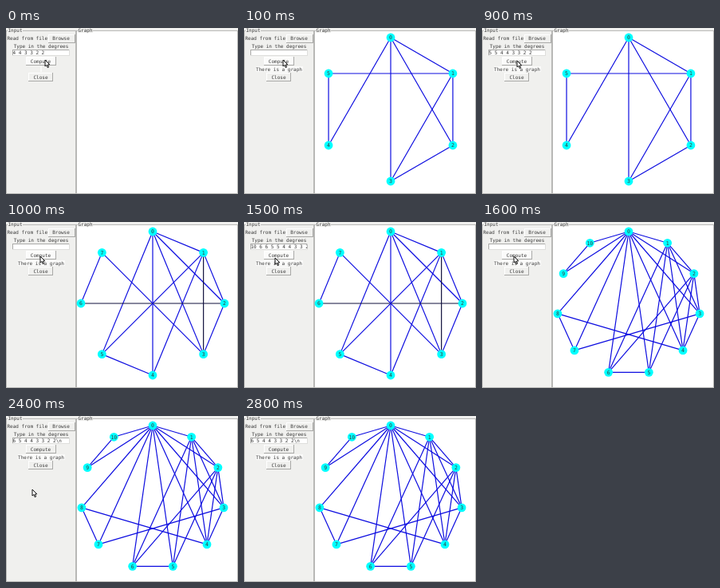
An HTML page with a canvas that plays this animation: 291 px wide and 208 px high, repeating every 3100 ms.

```html
<!DOCTYPE html>
<html lang="en">
<head>
<meta charset="utf-8">
<title>Degree sequence graph</title>
<style>
html, body { margin: 0; width: 100%; height: 100%; overflow: hidden; background: #f0f0ee; }
canvas { display: block; }
</style>
</head>
<body>
<canvas id="stage" width="291" height="208"></canvas>
<script>
const ctx = document.getElementById('stage').getContext('2d');
const LOOP = 3100, STEP = 100;
const BG = '#f0f0ee', INK = '#3a3a3a', EDGE = '#0c0ce0';
const FONT = '"DejaVu Sans Mono", "Liberation Mono", monospace';

// Connect the largest remaining degree to the next largest ones (Havel-Hakimi).
function buildEdges(degrees) {
  let left = degrees.map((need, id) => ({ id, need }));
  const edges = [];
  while (left.length) {
    left.sort((a, b) => b.need - a.need || 0);
    const head = left.shift();
    for (const v of left.slice(0, head.need)) {
      v.need--;
      edges.push([head.id, v.id]);
    }
  }
  return edges;
}

function makeGraph(sequence, dark = []) {
  const degrees = sequence.split(' ').map(Number);
  const nodes = degrees.map((_, i) => {
    const a = i * 2 * Math.PI / degrees.length;
    return [184 + 90 * Math.sin(a), 102 - 90 * Math.cos(a)];
  });
  const edges = buildEdges(degrees).map(([a, b]) => ({
    a, b, color: dark.includes(Math.min(a, b) + '-' + Math.max(a, b)) ? '#10103c' : EDGE
  }));
  return { nodes, edges };
}

const SEQ = ['4 4 3 3 2 2', '5 5 4 4 3 3 2 2', '10 6 6 5 5 4 4 3 3 2 2', '6 5 4 4 3 3 2 2\\n'];
const GRAPHS = [makeGraph(SEQ[0]), makeGraph(SEQ[1], ['1-3', '2-6']), makeGraph(SEQ[2])];

// [start, value] pairs; each value holds until the next start.
const GRAPH_AT = [[0, null], [100, GRAPHS[0]], [1000, GRAPHS[1]], [1600, GRAPHS[2]]];
const ENTRY_AT = [[0, SEQ[0]], [100, ''], [800, SEQ[1]], [1000, ''], [1400, SEQ[2]],
  [1600, ''], [2000, SEQ[3]]];
const POINTER_AT = [
  [0, [49, 40]], [300, [46, 56]], [400, [38, 98]], [500, [34, 119]], [600, [42, 76]],
  [700, [58, 20]], [800, [48, 30]], [900, [44, 41]], [1000, [43, 43]], [1100, [40, 66]],
  [1200, [35, 110]], [1300, [37, 72]], [1400, [38, 31]], [1500, [39, 45]],
  [1600, [40, 43]], [1700, [38, 64]], [1800, [35, 108]], [1900, [38, 70]],
  [2000, [41, 30]], [2100, [40, 37]], [2300, [37, 58]], [2400, [33, 92]],
  [2500, [29, 126]], [2600, [25, 158]], [2700, [12, 178]], [2800, null]
];

function valueAt(track, t) {
  let value = track[0][1];
  for (const [start, v] of track) if (t >= start) value = v;
  return value;
}

function box(x, y, w, h, fill) {
  ctx.fillStyle = fill;
  ctx.fillRect(x, y, w, h);
}

function text(s, x, y, align = 'center', size = 6) {
  ctx.font = size + 'px ' + FONT;
  ctx.textAlign = align;
  ctx.textBaseline = 'alphabetic';
  ctx.fillStyle = INK;
  ctx.fillText(s, x, y);
}

function bevel(x, y, w, h, fill, light = '#fff', shade = '#a9a9a7') {
  box(x, y, w, h, shade);
  box(x, y, w - 1, h - 1, light);
  box(x + 1, y + 1, w - 2, h - 2, fill);
}

function groupFrame(x, y, w, h, label, inner) {
  box(x, y, w, h, '#b8b8b6');
  box(x + 1, y + 1, w - 2, h - 2, inner);
  const width = label.length * 3.6;
  box(x + 2, 0, width + 1, 6, BG);
  text(label, x + 2.5, 5, 'left');
}

function drawPanel(entry, status, hover) {
  groupFrame(0, 3, 88, 205, 'Input', BG);
  bevel(1, 8, 52, 11, BG, BG, BG);
  text('Read from file', 1.5, 15, 'left');
  bevel(53, 8, 34, 11, BG);
  text('Browse', 69, 15);
  text('Type in the degrees', 44, 25);

  bevel(8, 27, 72, 8, '#fff', '#a9a9a7', '#dededc');
  ctx.save();
  ctx.beginPath();
  ctx.rect(9, 27, 70.5, 8);
  ctx.clip();
  text(entry, 8.5, 33, 'left');
  ctx.restore();

  bevel(25, 36, 38, 11, hover ? '#fbfbfa' : BG);
  text('Compute', 43.5, 44);
  if (status) {
    box(15, 48, 59, 7, '#fafaf9');
    text('There is a graph', 44, 54);
  } else {
    box(43, 48, 2, 7, '#fafaf9');
  }
  bevel(28, 56, 31, 11, BG);
  text('Close', 43.5, 64);
}

function drawGraph({ nodes, edges }) {
  ctx.lineWidth = 1.2;
  for (const { a, b, color } of edges) {
    ctx.strokeStyle = color;
    ctx.beginPath();
    ctx.moveTo(...nodes[a]);
    ctx.lineTo(...nodes[b]);
    ctx.stroke();
  }
  nodes.forEach(([x, y], i) => {
    ctx.fillStyle = '#00ffff';
    ctx.beginPath();
    ctx.arc(x, y, 5.4, 0, 2 * Math.PI);
    ctx.fill();
    text(String(i), x, y + 2.3, 'center', 6.5);
  });
}

function drawPointer([x, y]) {
  const shape = [[0, 0], [0, 8], [1.9, 6.4], [3.2, 9.6], [4.6, 9], [3.3, 6], [5.8, 5.8]];
  ctx.beginPath();
  shape.forEach(([dx, dy]) => ctx.lineTo(x + dx, y + dy));
  ctx.closePath();
  ctx.fillStyle = '#fff';
  ctx.fill();
  ctx.strokeStyle = '#111';
  ctx.lineWidth = 1;
  ctx.stroke();
}

function overCompute(p) {
  return !!p && p[0] >= 25 && p[0] < 63 && p[1] >= 36 && p[1] < 47;
}

function render(t) {
  const graph = valueAt(GRAPH_AT, t);
  const pointer = valueAt(POINTER_AT, t);
  box(0, 0, 291, 208, BG);
  drawPanel(valueAt(ENTRY_AT, t), graph, overCompute(pointer));
  groupFrame(88, 3, 203, 205, 'Graph', '#fff');
  if (graph) drawGraph(graph);
  if (pointer) drawPointer(pointer);
}

let start = null;
function tick(now) {
  if (start === null) start = now;
  const t = (now - start) % LOOP;
  render(Math.floor(t / STEP) * STEP);
  requestAnimationFrame(tick);
}
render(0);
requestAnimationFrame(tick);
</script>
</body>
</html>
```
